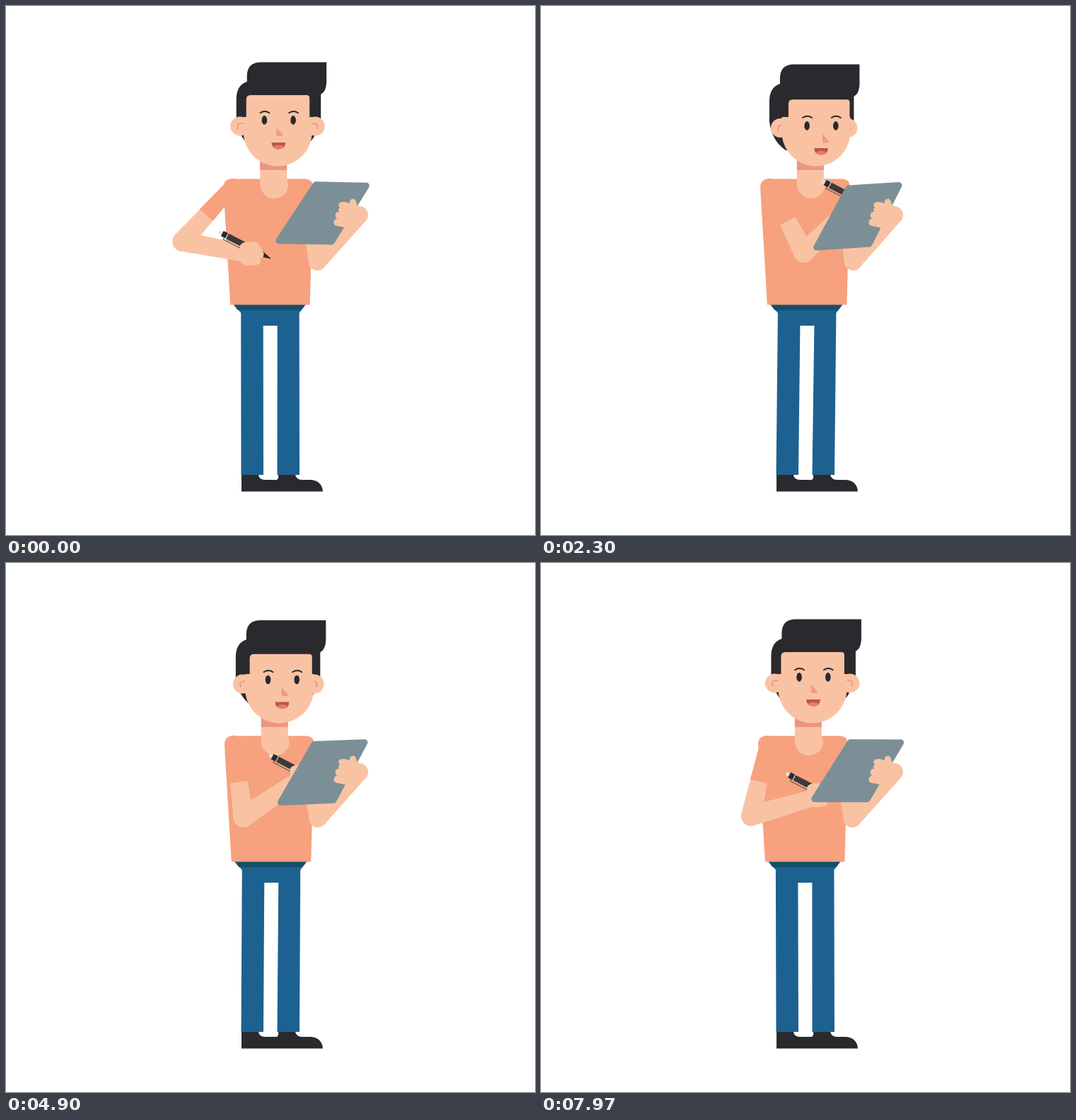
These frames come from a looping animation (748x748 px, 8 s). An HTML page with a canvas:

```html
<!DOCTYPE html>
<html lang="en">
<head>
<meta charset="utf-8">
<title>Man with clipboard</title>
<style>
html, body { margin: 0; width: 100%; height: 100%; overflow: hidden; background: #fff; }
canvas { display: block; width: 748px; height: 748px; }
</style>
</head>
<body>
<canvas id="stage"></canvas>
<script>
const SIZE = 748, LOOP = 8000;
const SKIN = '#f9c3a3', SHIRT = '#f7a17e', DARK = '#2a292e', PANTS = '#1d6190',
      BELT = '#144f6b', BOARD = '#7c8f97', BLUSH = '#f09b88';

const canvas = document.getElementById('stage');
const ctx = canvas.getContext('2d');
const ratio = window.devicePixelRatio || 1;
canvas.width = canvas.height = SIZE * ratio;

// Rows are [time, value, value...]
const HEAD_TURN = [[0, 0], [500, 0], [1450, 1], [4300, 1], [5420, 0]];
const BOARD_TILT = [[0, 0], [400, 0.25], [1030, 0.87], [1600, 1], [3300, 0.98], [4900, 0.7], [6770, 0.36], [8000, 0.2]];
const EYES = [[0, 1], [6630, 1], [6740, 0.2], [6800, 0.2], [6910, 1]];
const ARM = [[0, 42, 11], [700, 42, 11], [1040, -7.6, -34], [1250, -7.6, -34], [2300, -27, -44],
             [3340, -14.6, -43.5], [3800, -7.6, -34], [6770, -6.6, -34], [7760, -6.6, -34], [8250, 42, 11]];

const smooth = p => p * p * (3 - 2 * p);
const linear = p => p;
const rad = deg => deg * Math.PI / 180;

function sample(rows, t, ease = smooth) {
  const i = rows.findIndex(row => row[0] > t);
  if (i < 0) return rows[rows.length - 1].slice(1);
  const a = rows[i - 1], b = rows[i];
  const p = ease((t - a[0]) / (b[0] - a[0]));
  return a.slice(1).map((v, k) => v + (b[k + 1] - v) * p);
}

function fill(color, path) {
  ctx.fillStyle = color;
  ctx.fill(new Path2D(path));
}

function line(color, width, path) {
  ctx.strokeStyle = color;
  ctx.lineWidth = width;
  ctx.lineCap = ctx.lineJoin = 'round';
  ctx.stroke(new Path2D(path));
}

function oval(color, x, y, rx, ry = rx) {
  ctx.fillStyle = color;
  ctx.beginPath();
  ctx.ellipse(x, y, rx, ry, 0, 0, 7);
  ctx.fill();
}

function at(x, y, draw, angle = 0) {
  ctx.save();
  ctx.translate(x, y);
  ctx.rotate(angle);
  draw();
  ctx.restore();
}

// Tapered limb between two joints; part < 1 stops it with a flat end
function limb(color, [x1, y1], r1, [x2, y2], r2, part = 1) {
  const length = Math.hypot(x2 - x1, y2 - y1) * part;
  const end = r1 + (r2 - r1) * part;
  at(x1, y1, () => {
    oval(color, 0, 0, r1);
    fill(color, `M0 ${-r1} L${length} ${-end} V${end} L0 ${r1}Z`);
    if (part === 1) oval(color, length, 0, r2);
  }, Math.atan2(y2 - y1, x2 - x1));
}

function legs(dx) {
  const x = v => v + dx;
  fill(PANTS, `M${x(322)} 422 H${x(424)} L${x(415)} 434 L415 663 H383.5 L${x(384)} 452
    H${x(364)} L364 663 H332.5 L${x(332.5)} 434Z`);
  fill(BELT, `M${x(322)} 422 H${x(424)} L${x(418)} 430 H${x(328)}Z`);
  fill(DARK, `M333 663 H357 Q358 670 366 670 H383 Q386 668 385 663 H409
    Q411 670 418 670 H432 Q447 672 448 686.5 H333Z`);
}

function torso() {
  fill(SHIRT, 'M307.7 258 Q307 245 319 244.5 H424 Q434 245 434.5 256 L430 422.5 H317.5Z');
  fill(SKIN, 'M359.5 215 H397.5 V244.5 L399.5 252 A20 20 0 0 1 359.5 252Z');
  fill('#eb9684', 'M359.5 215 H397.5 V232 H359.5Z');
}

function hair(u) {
  at(-5.5 * u, 3 * u, () => {
    fill(DARK, `M326 132 Q326 112 341 107 V99.6 Q341 79.6 361 79.6 H453.5 V108 Q453 121 445.5 125
      V160 Q438 186 430 192 L420 201 H349 Q329 187 326 160Z`);
  });
}

function ear(x, y, side) {
  oval(SKIN, x, y, 13.5);
  at(x, y, () => {
    ctx.scale(side, 1);
    line(BLUSH, 2, 'M-3 4 Q-5 -5 4 -4');
  });
}

function brow(x, y) {
  line(DARK, 1.9, `M${x - 6.5} ${y + 1.5} Q${x} ${y - 3} ${x + 6.5} ${y + 1.5}`);
}

function head(u, open) {
  hair(u);
  ear(331 + 5 * u, 170 + 2.5 * u, 1);
  ear(437.5 - 6 * u, 170 + 2.5 * u, -1);
  const left = 340 + 7.5 * u, right = 429.5 + 4.5 * u, top = 126 + 6.3 * u;
  fill(SKIN, `M${left} 180 V${top + 6} Q${left} ${top} ${left + 6} ${top} H${right - 4}
    Q${right} ${top} ${right} ${top + 4} V180Z`);
  at(2 * u, 0, () => fill(SKIN, 'M336 157 H433 V178 A48.5 48.5 0 0 1 336 178Z'));
  at(8 * u, 8 * u, () => {
    for (const x of [365.7, 406.4]) {
      oval(DARK, x, 161.4, 3.8, 6.3 * open);
      brow(x + 0.5, 149.7 - 1.2 * u);
    }
    fill('#bf554a', 'M375.8 193 H395.5 Q395.5 202.3 385.6 202.5 Q376 202.3 375.8 193Z');
    fill('#e57b70', 'M378 199 Q385.5 194.5 393.5 199 Q390.5 202.5 385.6 202.5 Q380.5 202.5 378 199Z');
  });
  at(13 * u, 9.5 * u, () => fill(BLUSH, 'M382.5 171.5 L391.5 181 Q392.5 184 388 184 H382.5Z'));
}

function pen() {
  fill('#e8ded6', 'M-4 -2.5 H2 V2.5 H-4Z');
  fill(DARK, 'M1 -4.2 H8 V4.2 H1Z');
  fill('#cfc8c4', 'M8 -4.2 H9.2 V4.2 H8Z');
  fill('#3a3a3c', 'M9.2 -4.2 H63 V4.2 H9.2Z');
  fill(DARK, 'M63 -4.2 L78 -0.5 V0.5 L63 4.2Z');
  line('#5d5552', 1.1, 'M6 4 V6.8 H36');
}

function fist() {
  fill(SKIN, `M-16 -12 Q-13 -17 -6 -17 Q2 -18 6 -17 Q11 -16 10 -11 Q16 -10 15 -5 Q19 -2 17 3
    Q16 6 12 6 Q15 13 9 15 Q0 17 -9 16 L-16 11Z`);
}

function writingArm(dx, upper, lower) {
  const a = rad(upper), b = rad(lower);
  const shoulder = [321 + dx, 254];
  const elbow = [shoulder[0] - 106 * Math.sin(a), 254 + 106 * Math.cos(a)];
  const along = d => [elbow[0] + d * Math.cos(b), elbow[1] + d * Math.sin(b)];
  const hand = along(99);
  limb(SKIN, shoulder, 10, elbow, 14.3);
  limb(SHIRT, shoulder, 10, elbow, 14.8, 0.53);
  limb(SKIN, elbow, 14.3, along(82), 12);
  at(hand[0] - 42, hand[1] - 30.5, pen, rad(27.5));
  at(hand[0], hand[1] - 1, fist);
}

function board(tilt) {
  at(500, 293, () => {
    ctx.translate(-500, -293);
    const path = 'M438 252.7 L509.3 254.2 L460.5 333 L386 331.7Z';
    fill(BOARD, path);
    line(BOARD, 9, path);
  }, rad(-4.9 * tilt));
}

function holdingArm(dx) {
  const elbow = [440.5 + 0.4 * dx, 361.3];
  limb(SKIN, [430 + dx, 292], 12.5, elbow, 12.5);
  limb(SKIN, elbow, 12.5, [499.5, 295.5], 12.5);
}

function holdingHand() {
  fill(SKIN, `M472 285 Q468 280 473 277.5 Q480 276 485.5 279.5 Q485.5 273 491 272.5
    Q495 273 496 281 L508 287 Q513 292 511 298 L492 319 L478 313 L466 310.5
    Q461 307 465.5 301.5 Q467 300.5 468.5 300.5 Q463.5 297 467 292 Q468.5 291 471 291 Q468.5 287 472 285Z`);
}

function draw(t) {
  const dx = 3.2 * Math.sin((t - 30) / 1000 * Math.PI);
  const [turn] = sample(HEAD_TURN, t);
  const [tilt] = sample(BOARD_TILT, t, linear);
  const [open] = sample(EYES, t);
  const [upper, lower] = sample(ARM, t);

  ctx.setTransform(ratio, 0, 0, ratio, 0, 0);
  ctx.fillStyle = '#fff';
  ctx.fillRect(0, 0, SIZE, SIZE);
  legs(dx);
  at(dx, 0, () => {
    torso();
    head(turn, open);
  });
  holdingArm(dx);
  writingArm(dx, upper, lower);
  board(tilt);
  holdingHand();
}

const start = performance.now();
function frame() {
  draw((performance.now() - start) % LOOP);
  requestAnimationFrame(frame);
}
frame();
</script>
</body>
</html>
```
